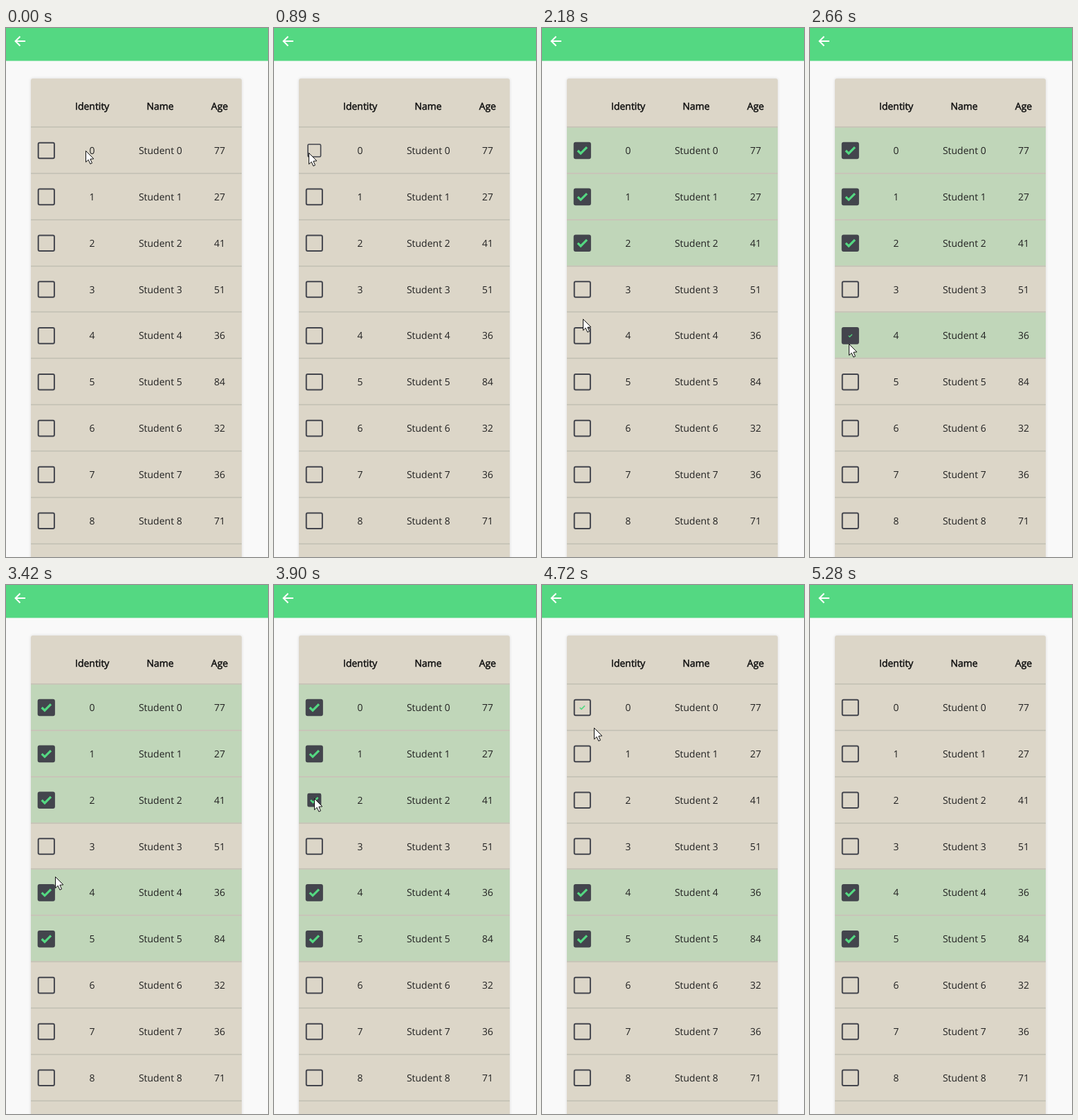
An HTML page with a canvas that plays this animation: 379 px wide and 764 px high, repeating every 5.81 s.

```html
<!DOCTYPE html>
<html lang="en">
<head>
<meta charset="utf-8">
<style>
  html, body { margin: 0; width: 100%; height: 100%; overflow: hidden; background: #f9f9f9; }
  canvas { display: block; }
</style>
</head>
<body>
<canvas id="stage" width="379" height="764"></canvas>
<script>
const ctx = document.getElementById('stage').getContext('2d');
const LOOP = 5810, STEP = 69, PHASE = 31;
const GREEN = '#54d882', DARK = '#43454d', SAND = '#dcd6c8', SELECTED = '#c0d6b9';
const ROW_TOP = 143, ROW_HEIGHT = 66.85;
const PRESS_TIME = 70, TICK_TIME = 160, POINTER_END = 5270;
const ages = [77, 27, 41, 51, 36, 84, 32, 36, 71];

const clicks = [
  { row: 0, at: 850 }, { row: 1, at: 1470 }, { row: 2, at: 1890 }, { row: 4, at: 2520 },
  { row: 5, at: 2960 }, { row: 2, at: 3880 }, { row: 1, at: 4300 }, { row: 0, at: 4580 }
];

// Eased pointer moves; bow bends the path to the right of its direction.
const start = [116, 178];
const moves = [
  { from: 0, until: 130, to: [113, 173] },
  { from: 200, until: 750, to: [51, 181], bow: 31 },
  { from: 960, until: 1560, to: [53, 253] },
  { from: 1560, until: 1900, to: [56, 320] },
  { from: 1960, until: 2275, to: [57, 457], bow: -4 },
  { from: 2690, until: 2960, to: [58, 535] },
  { from: 3050, until: 3774, to: [59, 309], bow: 13.5 },
  { from: 3970, until: 4300, to: [59, 233] },
  { from: 4380, until: 4520, to: [58, 175] },
  { from: 4640, until: 5206, to: [306, 744], bow: -20 }
];

const clamp = v => Math.max(0, Math.min(1, v));
const ease = k => k * k * (3 - 2 * k);

function pointerAt(t) {
  let [x, y] = start;
  for (const { from, until, to, bow = 0 } of moves) {
    if (t < from) break;
    const k = ease(clamp((t - from) / (until - from)));
    const dx = to[0] - x, dy = to[1] - y;
    const bend = bow * Math.sin(Math.PI * k) / Math.hypot(dx, dy);
    x += dx * k - dy * bend;
    y += dy * k + dx * bend;
  }
  return [Math.round(x), Math.round(y)];
}

function rowState(row, t) {
  const state = { checked: false, scale: 1, tick: 0 };
  for (const click of clicks) {
    if (click.row !== row || t < click.at) continue;
    const age = t - click.at - PRESS_TIME;
    if (age < 0) {
      state.scale = 0.8;
    } else {
      const k = clamp(age / TICK_TIME);
      state.checked = !state.checked;
      state.tick = state.checked ? k : 1 - k;
    }
  }
  return state;
}

function rect(color, x, y, w, h) {
  ctx.fillStyle = color;
  ctx.fillRect(x, y, w, h);
}

function line(points, color, width) {
  ctx.beginPath();
  points.forEach(p => ctx.lineTo(...p));
  ctx.strokeStyle = color;
  ctx.lineWidth = width;
  ctx.stroke();
}

function label(text, x, y, heavy) {
  ctx.fillStyle = ctx.strokeStyle = heavy ? '#111' : '#222';
  ctx.fillText(text, x, y);
  if (heavy) {
    ctx.lineWidth = 0.5;
    ctx.strokeText(text, x, y);
  }
}

function checkbox(y, { checked, scale, tick }) {
  ctx.save();
  ctx.translate(58.3, y);
  ctx.scale(scale, scale);
  ctx.beginPath();
  ctx.roundRect(-11.6, -11.3, 23.2, 22.6, 2);
  ctx.strokeStyle = ctx.fillStyle = DARK;
  ctx.lineWidth = 2;
  ctx.stroke();
  if (checked) ctx.fill();
  if (tick > 0) {
    ctx.scale(tick, tick);
    line([[-6.6, 0], [-2.3, 4.2], [6.7, -4.8]], GREEN, 3.2);
  }
  ctx.restore();
}

function pointer(x, y) {
  ctx.save();
  ctx.translate(x - 0.5, y - 0.5);
  ctx.beginPath();
  [[0, 0], [0, 16.2], [3.7, 12.8], [6.4, 18.8], [9, 17.6], [6.4, 11.8], [11.4, 11.4]]
    .forEach(p => ctx.lineTo(...p));
  ctx.closePath();
  ctx.fillStyle = '#fff';
  ctx.strokeStyle = '#111';
  ctx.lineWidth = 1;
  ctx.fill();
  ctx.stroke();
  ctx.restore();
}

function draw(t) {
  rect('#f9f9f9', 0, 0, 379, 764);
  rect(GREEN, 0, 0, 379, 47.5);
  line([[28, 19], [13.5, 19]], '#fff', 2);
  line([[20.4, 12.2], [13.6, 19], [20.4, 25.8]], '#fff', 2);

  ctx.save();
  ctx.shadowColor = 'rgba(0,0,0,.13)';
  ctx.shadowBlur = 4;
  ctx.fillStyle = SAND;
  ctx.beginPath();
  ctx.roundRect(36, 73, 305, 720, 3);
  ctx.fill();
  ctx.restore();

  ctx.font = '14px "Open Sans", sans-serif';
  ctx.textAlign = 'center';
  ctx.textRendering = 'geometricPrecision';
  label('Identity', 124.7, 118, true);
  label('Name', 223, 118, true);
  label('Age', 309, 118, true);

  ages.forEach((age, i) => {
    const top = ROW_TOP + i * ROW_HEIGHT, middle = top + 34;
    const baseline = Math.round(middle) + 5;
    const state = rowState(i, t);
    if (state.checked) rect(SELECTED, 36, Math.round(top), 305, 67);
    checkbox(middle, state);
    label(i, 124.5, baseline);
    label('Student ' + i, 223.3, baseline);
    label(age, 309, baseline);
  });
  for (let i = 0; i <= ages.length; i++) {
    rect('#c8c5b8', 36, Math.round(ROW_TOP + i * ROW_HEIGHT) - 1, 305, 2);
  }

  if (t < POINTER_END) pointer(...pointerAt(t));
}

function frame() {
  const t = performance.now() % LOOP;
  // The picture advances in coarse steps.
  draw(Math.floor((t - PHASE + 2) / STEP) * STEP + PHASE);
  requestAnimationFrame(frame);
}
frame();
</script>
</body>
</html>
```
